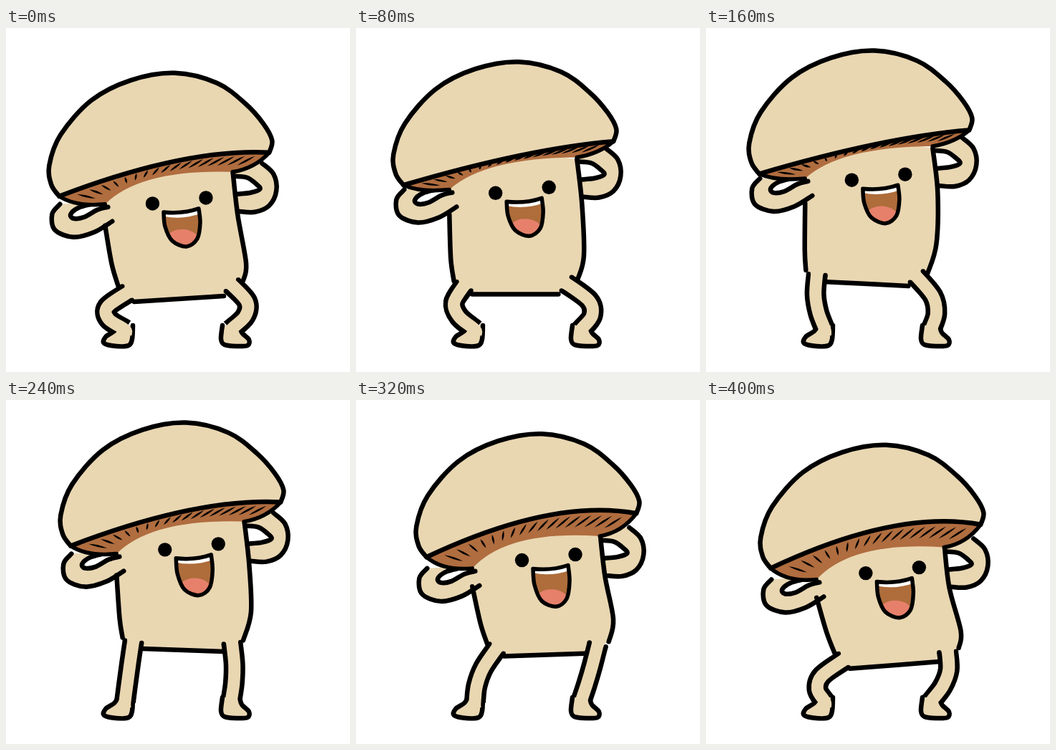
An HTML page with a canvas that plays this animation: 480 px wide and 480 px high, repeating every 0.44 s.

```html
<!DOCTYPE html>
<html lang="en">
<head>
<meta charset="utf-8">
<title>Dancing mushroom</title>
<style>
  html, body { margin: 0; width: 100%; height: 100%; overflow: hidden; background: #fff; }
  canvas { display: block; }
</style>
</head>
<body>
<canvas id="stage" width="480" height="480"></canvas>
<script>
const ctx = document.getElementById('stage').getContext('2d');
const SKIN = '#e9d7b2', GILL = '#b06d3f', MOUTH = '#ae6d3b', TONGUE = '#e6806b', INK = '#000';
const LINE = 6.5, STEP_MS = 40;
// The sway takes 12 steps, but the loop restarts one step early.
const STEPS = 11, SWAY = 12;

const leftFoot = [[156, 415], [151, 423], [139, 431], [137, 440], [154, 444], [171, 443], [176, 434], [177, 415]];
const rightFoot = [[302, 415], [300, 434], [305, 442], [322, 444], [337, 443], [339, 435], [329, 425], [326, 415]];

const mix = (a, b, t) => [a[0] + (b[0] - a[0]) * t, a[1] + (b[1] - a[1]) * t];
const add = (a, b) => [a[0] + b[0], a[1] + b[1]];
const quad = (a, b, c, t) => mix(mix(a, b, t), mix(b, c, t), t);

// Sine sway around a mean, highest at the peak step.
const sway = (step, mean, reach, peak) => mean + reach * Math.cos((step - peak) * 2 * Math.PI / SWAY);

function poseAt(step) {
  const at = (x, y) => [sway(step, ...x), sway(step, ...y)];
  const cap = at([7.3, 16, 8], [-16.8, 18, 11]);
  const lift = sway(step, -1.3, 3.5, 1.5);
  const bend = sway(step, 169, 18, 3);
  return {
    cap, bend,
    face: add(cap, [sway(step, 1.3, 2.5, 8.5), lift]),
    stretch: Math.max(0, -lift),
    drop: 2 + (169 - bend) * 0.3,
    leftMid: at([153, 21.5, 8.5], [317, 12, -0.2]),
    leftEnd: at([160, 25.5, 8.8], [347, 15.5, -0.2]),
    baseLeft: at([184.5, 23, 8.5], [364.5, 17.5, -0.2]),
    baseRight: at([304, 25, 9], [362.5, 12, 0.6]),
    rightMid: at([338.5, 22, 8.7], [312, 16.5, -0.3]),
    rightEnd: at([331, 25, 9], [344, 9, 0.6]),
    leftKnee: -sway(step, 13.5, 13, -0.2),
    rightKnee: sway(step, 12.5, 12.5, 1.5)
  };
}

// Smooth curve through the points, continuing the given path if there is one.
function curve(points, path) {
  if (path) path.lineTo(...points[0]);
  else (path = new Path2D()).moveTo(...points[0]);
  for (let i = 0; i < points.length - 1; i++) {
    const a = points[i], b = points[i + 1];
    const before = points[i - 1] || a, after = points[i + 2] || b;
    path.bezierCurveTo(
      a[0] + (b[0] - before[0]) / 6, a[1] + (b[1] - before[1]) / 6,
      b[0] - (after[0] - a[0]) / 6, b[1] - (after[1] - a[1]) / 6, ...b);
  }
  return path;
}

function fill(path, color) {
  ctx.fillStyle = color;
  ctx.fill(path);
}

function stroke(path, width = LINE, color = INK) {
  ctx.lineWidth = width;
  ctx.strokeStyle = color;
  ctx.stroke(path);
}

function dot(x, y, radius) {
  ctx.beginPath();
  ctx.arc(x, y, radius, 0, Math.PI * 2);
  ctx.fillStyle = INK;
  ctx.fill();
}

function shifted([x, y], draw) {
  ctx.save();
  ctx.translate(x, y);
  draw();
  ctx.restore();
}

// An arm is a filled band with a white gap; the anchor closes the fill under the cap.
function drawArm(outer, anchor, hole) {
  const band = curve(outer);
  band.lineTo(...anchor);
  fill(band, SKIN);
  stroke(curve(outer));
  fill(curve(hole), '#fff');
  stroke(curve(hole));
}

function drawArms() {
  drawArm([[76, 245], [65, 259], [69, 281], [95, 291], [124, 284], [149, 269]], [142, 240],
    [[143, 249], [128, 253], [110, 263], [95, 265], [91, 259], [102, 250], [120, 245]]);
  drawArm([[358, 188], [374, 203], [378, 226], [368, 247], [348, 256], [325, 255]], [318, 190],
    [[320, 206], [337, 208], [350, 217], [355, 224], [342, 229], [323, 231]]);
}

function drawTorso(pose) {
  const { cap, baseLeft, baseRight } = pose;
  const left = [add(cap, [139, 277]), pose.leftMid, pose.leftEnd];
  const right = [add(cap, [317, 200]), add(cap, [324, 262]), pose.rightMid, pose.rightEnd];
  const body = curve([add(cap, [140, 236]), ...left]);
  body.lineTo(...baseLeft);
  body.lineTo(...baseRight);
  curve([...right].reverse(), body);
  body.quadraticCurveTo(...add(cap, [190, 180]), ...add(cap, [140, 236]));
  fill(body, SKIN);
  shifted(add(cap, [0, pose.drop]), drawArms);
  stroke(curve(left));
  stroke(curve(right));
  stroke(curve([baseLeft, baseRight]));
}

function drawLeg(hip, ankle, bulge, foot) {
  const knee = add(mix(hip, ankle, 1 / 3), [bulge, 2]);
  const shin = add(mix(hip, ankle, 2 / 3), [bulge * 0.9, 2]);
  const length = Math.hypot(knee[0] - hip[0], knee[1] - hip[1]);
  const dx = (knee[0] - hip[0]) / length, dy = (knee[1] - hip[1]) / length;

  ctx.lineCap = 'butt';
  stroke(curve([hip, knee, shin, ankle]), 30);
  ctx.lineCap = 'round';
  for (const side of [-11.75, 11.75]) dot(hip[0] - dy * side, hip[1] + dx * side, LINE / 2);
  fill(curve(foot), SKIN);
  stroke(curve(foot));
  ctx.lineCap = 'butt';
  stroke(curve([add(hip, [-dx * 5, -dy * 5]), knee, shin, ankle, add(ankle, [0, 8])]), 17, SKIN);
  ctx.lineCap = 'round';
}

function drawLegs(pose) {
  const leftHip = add(mix(pose.leftEnd, pose.baseLeft, 0.5), [1, -2]);
  const rightHip = add(mix(pose.rightEnd, pose.baseRight, 0.5), [-2, -4]);
  drawLeg(leftHip, [166, 421], pose.leftKnee, leftFoot);
  drawLeg(rightHip, [314, 421], pose.rightKnee, rightFoot);
}

function drawLeaf(a, b, width) {
  const mid = mix(a, b, 0.5), length = Math.hypot(b[0] - a[0], b[1] - a[1]);
  const nx = (a[1] - b[1]) / length * width, ny = (b[0] - a[0]) / length * width;
  const path = new Path2D();
  path.moveTo(...a);
  path.quadraticCurveTo(mid[0] + nx, mid[1] + ny, ...b);
  path.quadraticCurveTo(mid[0] - nx, mid[1] - ny, ...a);
  fill(path, INK);
}

function drawCap(bend, drop) {
  const left = [75, 236], right = [368, 175], rimBend = [250, bend];
  const stemLeft = [139, 245 + drop], stemRight = [317, 200 + drop], stemBend = [188, 198];
  const leftCurl = [98, 249 + drop], rightCurl = [348, 195 + drop];

  const gills = new Path2D();
  gills.moveTo(...left);
  gills.quadraticCurveTo(...rimBend, ...right);
  gills.quadraticCurveTo(...rightCurl, ...stemRight);
  gills.quadraticCurveTo(...stemBend, ...stemLeft);
  gills.quadraticCurveTo(...leftCurl, ...left);
  fill(gills, GILL);

  const count = 17;
  for (let i = 0; i < count; i++) {
    const t = (i + 0.7) / (count + 0.4);
    const rim = quad(left, rimBend, right, t), stem = quad(stemLeft, stemBend, stemRight, t);
    drawLeaf(mix(rim, stem, 0.2), mix(rim, stem, 0.68), 2.8);
  }

  const edges = new Path2D();
  edges.moveTo(...left);
  edges.quadraticCurveTo(...leftCurl, ...stemLeft);
  edges.moveTo(...right);
  edges.quadraticCurveTo(...rightCurl, ...stemRight);
  stroke(edges, 5.5);

  const dome = curve([left, [64, 220], [61, 193], [77, 150], [120, 102], [175, 74], [236, 64],
    [295, 78], [335, 107], [360, 135], [372, 158], right]);
  dome.quadraticCurveTo(...rimBend, ...left);
  fill(dome, SKIN);
  stroke(dome);
}

function drawFace(stretch) {
  dot(204.5, 245, 9.7);
  dot(279, 237, 9.7);

  const mouth = curve([[220, 257], [222, 277 + stretch / 2], [232, 297 + stretch], [252, 305 + stretch],
    [267, 294 + stretch], [271, 272 + stretch / 2], [269, 252]]);
  mouth.quadraticCurveTo(246, 260, 220, 257);
  fill(mouth, MOUTH);
  ctx.save();
  ctx.clip(mouth);
  const teeth = new Path2D();
  teeth.moveTo(216, 250);
  teeth.lineTo(274, 246);
  teeth.lineTo(274, 258);
  teeth.quadraticCurveTo(246, 269, 216, 262);
  fill(teeth, '#fff');
  const tongue = new Path2D();
  tongue.ellipse(247, 300 + stretch, 25, 19, 0.1, 0, Math.PI * 2);
  fill(tongue, TONGUE);
  ctx.restore();
  stroke(mouth, 5.5);
}

function draw(step) {
  const pose = poseAt(step);
  ctx.fillStyle = '#fff';
  ctx.fillRect(0, 0, 480, 480);
  ctx.lineCap = ctx.lineJoin = 'round';
  drawTorso(pose);
  drawLegs(pose);
  shifted(pose.cap, () => drawCap(pose.bend, pose.drop));
  shifted(pose.face, () => drawFace(pose.stretch));
}

function tick() {
  draw(Math.floor(performance.now() / STEP_MS) % STEPS);
  requestAnimationFrame(tick);
}
tick();
</script>
</body>
</html>
```
